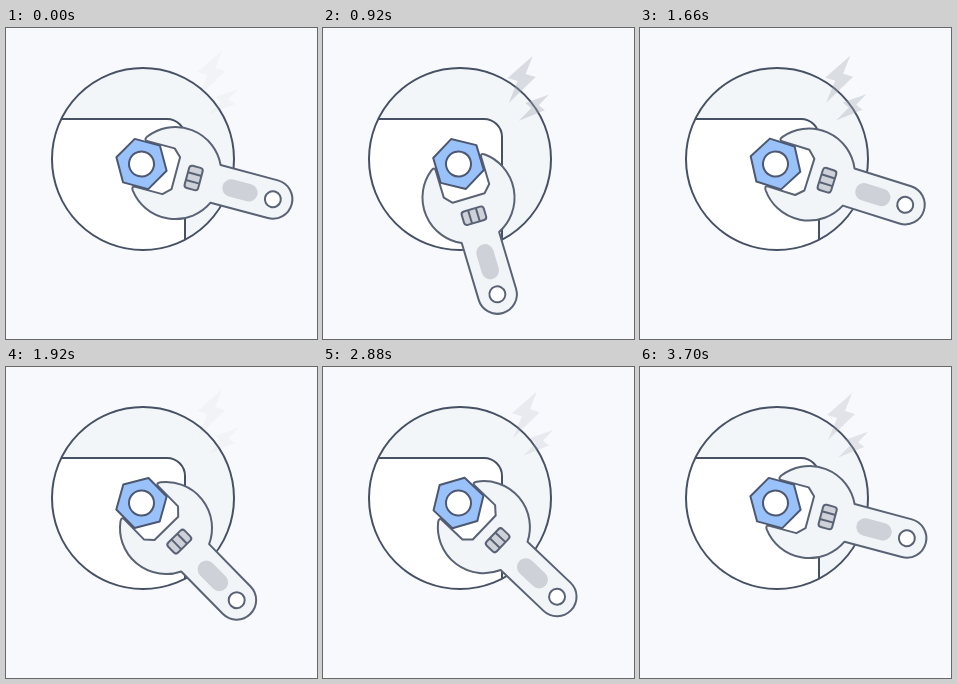
An HTML page for the animation above (3.72 s loop, 311 by 311 pixels).

```html
<!DOCTYPE html>
<html lang="en">
<head>
<meta charset="utf-8">
<title>Wrench turning a nut</title>
<style>
  html, body { margin: 0; width: 100%; height: 100%; overflow: hidden; background: #f8f9fc; }
  svg { display: block; width: 100%; height: 100%; }
</style>
</head>
<body>
<svg viewBox="0 0 311 311">
  <defs>
    <clipPath id="lens"><circle cx="137" cy="131" r="91"/></clipPath>
    <path id="bolt" d="M12-24L-13-2L-3 1L-12 23L15-3L5-6Z"/>
  </defs>

  <circle cx="137" cy="131" r="91" fill="#f2f6f8"/>
  <path clip-path="url(#lens)" d="M30 91H161A18 18 0 0 1 179 109V240H30Z"
        fill="#fff" stroke="#475164" stroke-width="2"/>
  <circle cx="137" cy="131" r="91" fill="none" stroke="#475164" stroke-width="2"/>

  <g id="bolts" fill="#a3a8b3">
    <use href="#bolt" x="204.5" y="46"/>
    <use href="#bolt" transform="translate(217.5 74) rotate(22) scale(.75)"/>
  </g>

  <g id="tool" stroke="#5a6375" stroke-width="2" stroke-linejoin="round">
    <path fill="#f1f5f8" d="M-1.5-28A46 46 0 0 1 76.7-19.5H136A19.5 19.5 0 0 1 136 19.5H76.7
      A46 46 0 0 1-1.5 28Q-4.5 23.7 0 23.7H28L35.5 16.6V-16.6L28-23.7H0Q-4.5-23.7-1.5-28Z"/>
    <rect x="84" y="-8.75" width="36" height="17.5" rx="8.75" fill="#ced2d8" stroke="none"/>
    <circle cx="136" r="8" fill="#fff"/>
    <rect x="47" y="-11.5" width="14" height="23" rx="3" fill="#ced2d8"/>
    <path d="M47-4H61M47 4H61"/>
    <path id="nut" fill="#99c2fb" stroke="#4d5870"/>
    <circle r="12.5" fill="#fff" stroke="#4d5870"/>
  </g>
</svg>
<script>
  const LOOP = 3720;
  const tool = document.getElementById('tool');
  const bolts = document.getElementById('bolts');

  const corners = Array.from({ length: 6 }, (_, i) => {
    const a = i * Math.PI / 3;
    return (26 * Math.cos(a)).toFixed(2) + ' ' + (26 * Math.sin(a)).toFixed(2);
  });
  document.getElementById('nut').setAttribute('d', 'M' + corners.join('L') + 'Z');

  const linear = x => x;
  const smooth = x => {
    const a = x ** 1.8;
    return a / (a + (1 - x) ** 1.8);
  };

  // Keys are [time, value, easing towards this key].
  const swing = [
    [0, 15], [80, 15], [835, 75, smooth], [1553, 15, smooth], [2281, 75, smooth],
    [2790, 45, smooth], [2840, 45], [3700, 15], [LOOP, 15]
  ];
  const flash = [
    [0, 0], [180, 0], [835, 1], [1190, 0], [1553, 1], [1917, 0],
    [2281, 1], [2820, .27], [LOOP, .5]
  ];

  function sample(keys, t) {
    const i = keys.findIndex(k => k[0] > t);
    const [t0, v0] = keys[i - 1];
    const [t1, v1, ease = linear] = keys[i];
    return v0 + (v1 - v0) * ease((t - t0) / (t1 - t0));
  }

  function draw(t) {
    tool.setAttribute('transform', `translate(135.5 136) rotate(${sample(swing, t)})`);
    const b = sample(flash, t);
    bolts.setAttribute('transform', `translate(${-9 * b} ${8 * b})`);
    bolts.setAttribute('opacity', .06 + .4 * b);
  }

  const start = performance.now();
  function tick() {
    draw((performance.now() - start) % LOOP);
    requestAnimationFrame(tick);
  }
  draw(0);
  requestAnimationFrame(tick);
</script>
</body>
</html>
```
